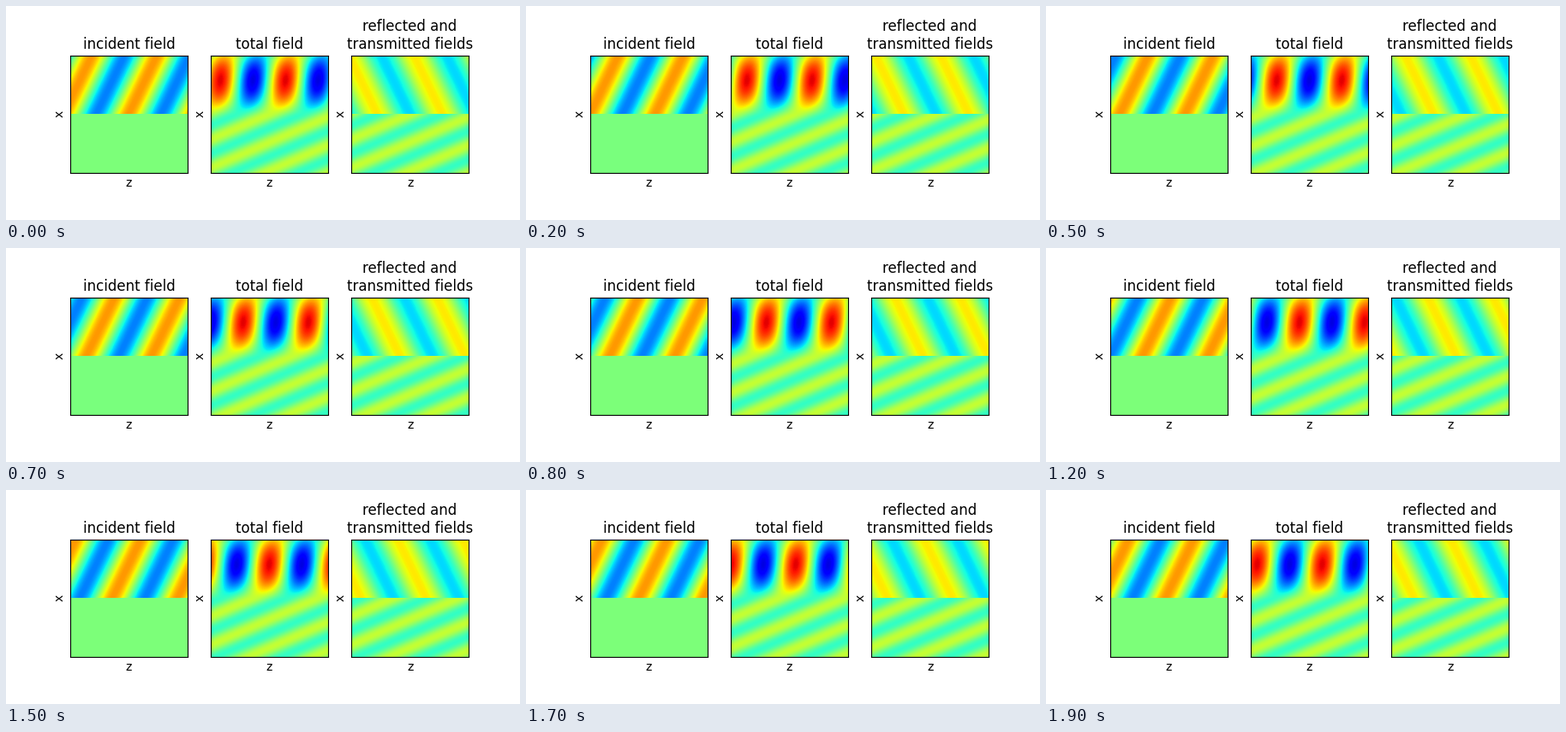
A matplotlib script for the animation above (2000 ms loop, 600 by 250 pixels).

```python
import numpy as np
import matplotlib.pyplot as plt
from matplotlib.animation import FuncAnimation

FRAMES, STEP_MS = 20, 100
N = 274
ANGLE = np.radians(64.3)   # angle of incidence
INDEX = 2.25               # refractive index of the lower medium

# The window is two vacuum wavelengths wide, with the interface at x = 0.
axis = (np.arange(N) + 0.5) / N * 2 - 1
z, x = np.meshgrid(axis, axis)
above = x < 0

k = 2 * np.pi
kz = k * np.sin(ANGLE)
kx_in = k * np.cos(ANGLE)
kx_out = np.sqrt((INDEX * k) ** 2 - kz ** 2)
r = (kx_in - kx_out) / (kx_in + kx_out)
t = 1 + r

incident = np.where(above, np.exp(1j * (kz * z + kx_in * x)), 0)
scattered = np.where(above,
                     r * np.exp(1j * (kz * z - kx_in * x)),
                     t * np.exp(1j * (kz * z + kx_out * x)))

panels = [
    ("incident field", incident),
    ("total field", incident + scattered),
    ("reflected and\ntransmitted fields", scattered),
]

plt.rcParams["font.family"] = "DejaVu Sans"
fig, axes = plt.subplots(1, 3, figsize=(6, 2.5), dpi=100)
images = []
for ax, (title, field) in zip(axes, panels):
    images.append(ax.imshow(field.real, cmap="jet", vmin=-2, vmax=2,
                            interpolation="nearest"))
    ax.set(title=title, xlabel="z", ylabel="x", xticks=[], yticks=[])


def update(i):
    phase = np.exp(-2j * np.pi * i / FRAMES)
    for image, (_, field) in zip(images, panels):
        image.set_data((field * phase).real)
    return images


anim = FuncAnimation(fig, update, frames=FRAMES, interval=STEP_MS,
                     repeat=True, repeat_delay=0)
plt.show()
```
